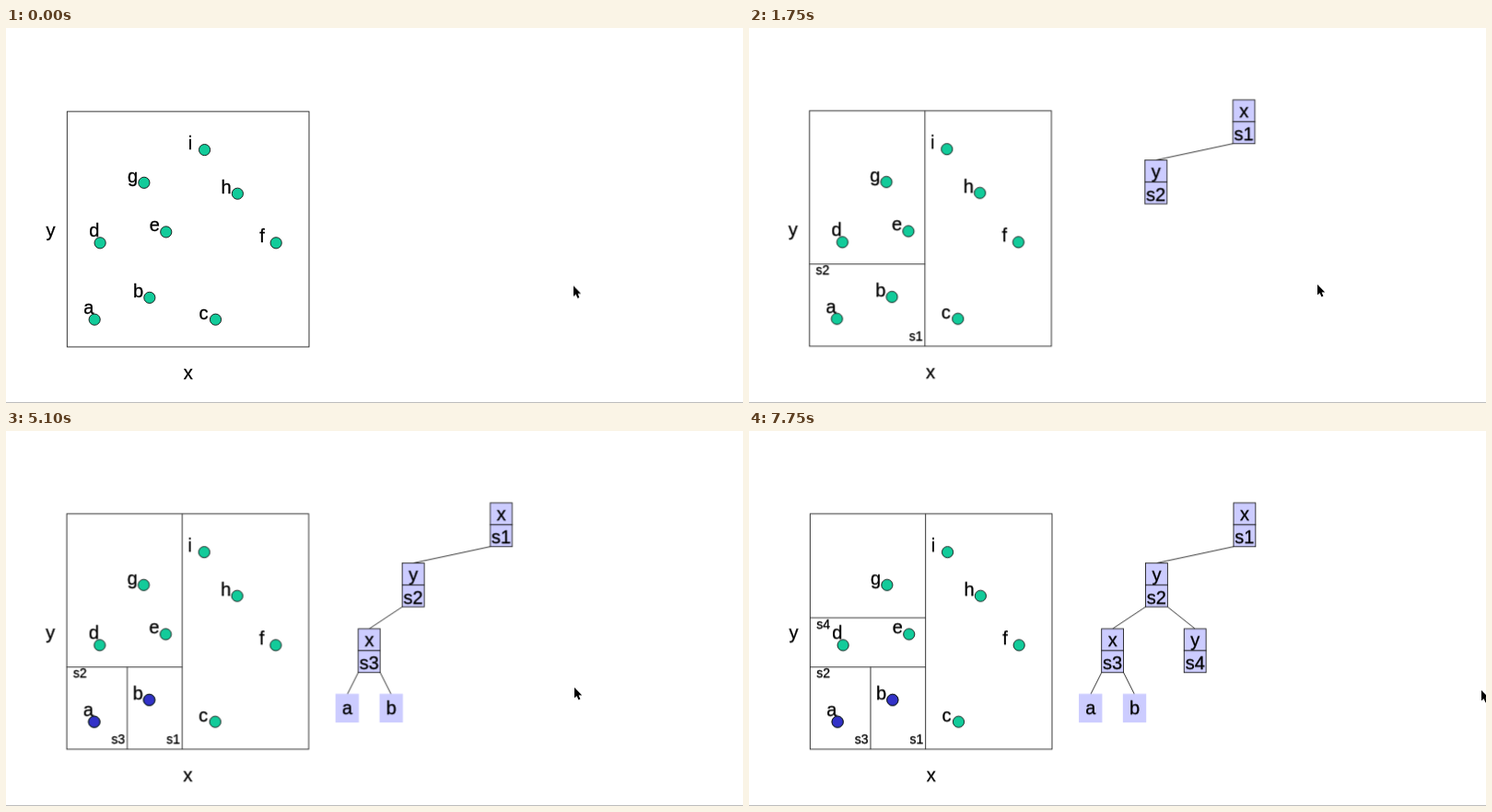
These frames come from a looping animation (800x408 px, 8 s). An HTML page:

```html
<!DOCTYPE html>
<html lang="en">
<head>
<meta charset="utf-8">
<title>Building a k-d tree</title>
<style>
  html, body { margin: 0; width: 100%; height: 100%; overflow: hidden; background: #fff; }
  svg { display: block; width: 800px; height: 408px; }
  text { font: 20px "Liberation Sans", Arial, sans-serif; fill: #000; stroke: #000; stroke-width: .3; }
  .mid { text-anchor: middle; }
  .small { font-size: 14px; }
  .line { fill: none; stroke: #111; stroke-width: .85; }
  .dot { fill: #12cb9a; stroke: #111; stroke-width: .9; }
  .done { fill: #3232c8; }
  .node { fill: #ccccff; stroke: #111; stroke-width: .85; }
  .leaf { fill: #ccccff; stroke: #ccccff; stroke-width: 1.5; }
  .arrow { fill: #000; stroke: #fff; stroke-width: 1; paint-order: stroke; }
</style>
</head>
<body>
<svg id="stage" viewBox="0 0 800 408"></svg>
<script>
const LOOP = 8000;
const gx = col => 66.3 + col * 5.97;
const gy = row => 90.9 + row * 5.955;
const stage = document.getElementById('stage');

function add(parent, tag, attrs, text) {
  const el = document.createElementNS('http://www.w3.org/2000/svg', tag);
  for (const k in attrs) el.setAttribute(k, attrs[k]);
  if (text) el.textContent = text;
  return parent.appendChild(el);
}

// Grid-based drawing helpers
const line = (p, c1, r1, c2, r2) =>
  add(p, 'line', { class: 'line', x1: gx(c1), y1: gy(r1), x2: gx(c2), y2: gy(r2) });

const rect = (p, cls, c, r, w, h) =>
  add(p, 'rect', { class: cls, x: gx(c), y: gy(r), width: gx(c + w) - gx(c), height: gy(r + h) - gy(r) });

const label = (p, text, c, r, cls = 'mid') =>
  add(p, 'text', { class: cls, x: gx(c), y: gy(r) }, text);

const dot = (p, [c, r], cls = '') =>
  add(p, 'circle', { class: 'dot ' + cls, cx: gx(c), cy: gy(r), r: 6.1 });

// Step animation from rows of [time, value]
function play(el, rows, toFrame) {
  const frames = rows.map(([t, v]) => ({ offset: t / LOOP, easing: 'steps(1, end)', ...toFrame(v) }));
  frames.push({ ...frames[frames.length - 1], offset: 1 });
  el.animate(frames, { duration: LOOP, iterations: Infinity });
}

const move = ([x, y]) => ({ transform: `translate(${x}px, ${y}px)` });

add(stage, 'rect', { x: 0, y: 407, width: 800, height: 1, fill: '#bcbcbc' });
const slide = add(stage, 'g');
const times = [];

function reveal(time) {
  const g = add(slide, 'g');
  play(g, [[0, 0], [time, 1]], opacity => ({ opacity }));
  times.push(time);
  return g;
}

// Plot
const area = { left: 0, top: 0, right: 44, bottom: 43 };
const points = {
  a: [5, 38], b: [15, 34], c: [27, 38], d: [6, 24], e: [18, 22],
  f: [38, 24], g: [14, 13], h: [31, 15], i: [25, 7]
};
rect(slide, 'line', 0, 0, area.right, area.bottom);
label(slide, 'x', 22, 48.8);
label(slide, 'y', -3, 22.85);
for (const [name, point] of Object.entries(points)) {
  const [c, r] = point;
  const lift = c < 10 ? 1 : 0; // keeps labels inside the left edge
  dot(slide, point);
  label(slide, name, c - 3 + lift, r - lift - .1, '');
}

// Edge from the parent's lower corner to the top centre of its child
function link(g, parent, col, row) {
  if (!parent) return;
  const corner = col < parent.col ? parent.col : parent.col + 4;
  line(g, corner, parent.row + 8, col + 2, row);
}

// Cuts a cell at a grid position and adds the matching tree node
function split(time, name, axis, at, cell, parent, col, row) {
  const g = reveal(time);
  const { left, top, right, bottom } = cell;
  if (axis === 'x') {
    line(g, at, top, at, bottom);
    label(g, name, at - 1.65, bottom - 1, 'mid small');
  } else {
    line(g, left, at, right, at);
    label(g, name, left + 2.4, at + 1.95, 'mid small');
  }
  link(g, parent, col, row);
  [axis, name].forEach((text, i) => {
    rect(g, 'node', col, row + 4 * i, 4, 4);
    label(g, text, col + 2, row + 3.2 + 4.2 * i);
  });
  return {
    col, row,
    low: axis === 'x' ? { ...cell, right: at } : { ...cell, top: at },
    high: axis === 'x' ? { ...cell, left: at } : { ...cell, bottom: at }
  };
}

function leaf(time, name, parent, col, row) {
  const g = reveal(time);
  dot(g, points[name], 'done');
  link(g, parent, col, row);
  rect(g, 'leaf', col, row, 4, 5);
  label(g, name, col + 2, row + 3.65);
}

const s1 = split(350, 's1', 'x', 21, area, null, 77, -2);
const s2 = split(1750, 's2', 'y', 28, s1.low, s1, 61, 9);
const s3 = split(3000, 's3', 'x', 11, s2.low, s2, 53, 21);
leaf(4000, 'a', s3, 49, 33);
leaf(5100, 'b', s3, 57, 33);
split(5900, 's4', 'y', 19, s2.high, s2, 68, 21);

// The slide sways by under a pixel each time something is added
const sway = t => [-.9 * Math.sin(Math.PI * t / 6000), t < 1750 ? 0 : -.8];
play(slide, [0, ...times].map(t => [t, sway(t)]), move);

// Pointer: small nudges, then a quick eased exit to the right
const pointer = add(stage, 'path', {
  class: 'arrow',
  d: 'M0 0V11.6L2.6 9.2L4.5 13.6L6.4 12.8L4.6 8.5H8.2Z'
});
const path = [[0, [616, 280.5]], [100, [617, 279]], [6050, [618.8, 278.2]], [7050, [643, 280]]];
for (let i = 1; i <= 6; i++) {
  const k = (1 - Math.cos(Math.PI * i / 6)) / 2;
  path.push([7450 + 50 * i, [643 + 152 * k, 280 + 2 * k]]);
}
play(pointer, path, move);
</script>
</body>
</html>
```
